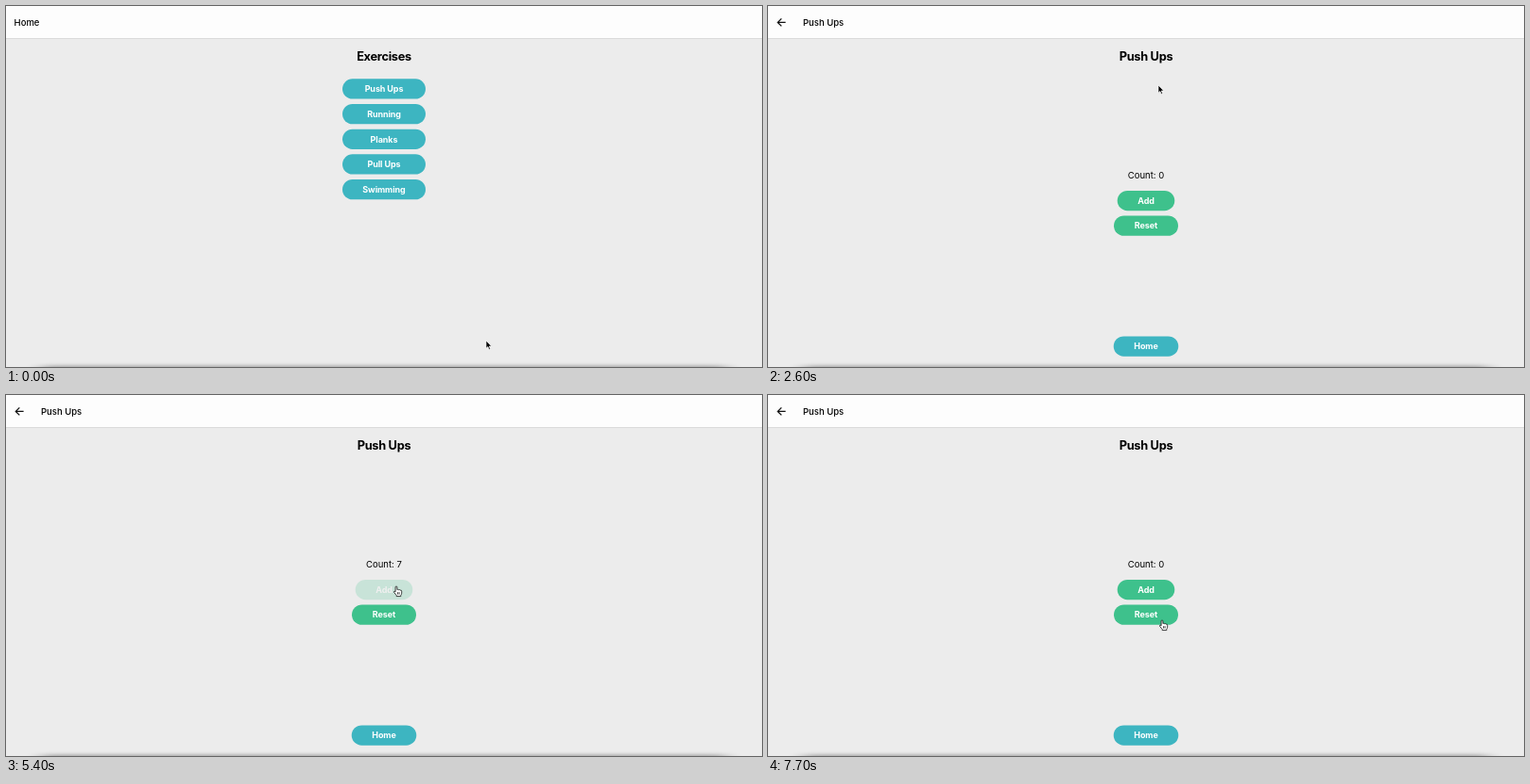
Animation of 800 by 383 pixels, one loop 8000 ms. Source, as an HTML page:

```html
<!DOCTYPE html>
<html lang="en">
<head>
<meta charset="utf-8">
<title>Exercise counter</title>
<style>
  html, body { margin: 0; width: 100%; height: 100%; overflow: hidden; background: #ececec; }
  svg { display: block; width: 100vw; height: 100vh; font-family: Inter, "Open Sans", sans-serif; }
  .nav { font-size: 9.5px; font-weight: 500; }
  .title { font-size: 12.8px; font-weight: 700; letter-spacing: -.3px; text-anchor: middle; }
  .count { font-size: 9.5px; text-anchor: middle; }
  .button text { font-size: 9px; font-weight: 700; letter-spacing: -.1px; text-anchor: middle; fill: #fff; }
  .teal rect { fill: #3db5c1; }
  .green rect { fill: #3ec18c; }
</style>
</head>
<body>
<svg viewBox="0 0 800 383" preserveAspectRatio="none">
  <defs>
    <filter id="blur" x="-10%" y="-300%" width="120%" height="700%">
      <feGaussianBlur stdDeviation="9 2.2"/>
    </filter>
  </defs>
  <rect width="800" height="383" fill="#ececec"/>
  <rect x="38" y="382" width="724" height="6" fill="#000" opacity=".36" filter="url(#blur)"/>
  <rect width="800" height="34" fill="#fdfdfd"/>
  <rect y="34" width="800" height="1" fill="#dadada"/>

  <g id="list">
    <text class="nav" x="8.6" y="21">Home</text>
    <text class="title" x="400" y="58.3">Exercises</text>
  </g>

  <g id="detail">
    <path d="M18.6 17.4H10.6M14.3 13.4L10.3 17.4L14.3 21.4" fill="none" stroke="#111" stroke-width="1.3"/>
    <text class="nav" x="37" y="21">Push Ups</text>
    <text class="title" x="400" y="58.3">Push Ups</text>
    <text class="count" id="count" x="400" y="183">Count: 0</text>
  </g>

  <g id="cursor">
    <path id="arrow" d="M0 0V8.2L1.9 6.5L3.2 9.4L4.6 8.8L3.3 6H5.8Z" fill="#000" stroke="#fff" stroke-width=".7"/>
    <path id="hand" d="M-.9 .9Q-.9 0 0 0Q.9 0 .9 .9V3.5Q1.6 2.9 2.5 3.7Q3.4 3.2 4.1 4.1Q5.6 3.8 5.7 5.2V7.2Q5.6 8.5 4.8 9.3V10.6H.2V9.6L-2.4 6.3Q-2.7 5.2-1.8 5.1L-.9 5.9Z M1.6 6.2V8.6M3.1 6.2V8.6" fill="#fff" stroke="#111" stroke-width=".8" stroke-linejoin="round"/>
  </g>
</svg>
<script>
const $ = id => document.getElementById(id);
const LOOP = 8000, STEP = 100;
const PAGE_SWITCH = 2560, RESET = 7430, PRESS = 80;
const ADDS = [4090, 4290, 4480, 4680, 4870, 5060, 5250, 5450, 5860, 6260];

// time, x, y of the pointer tip
const PATH = [
  [200, 508, 355], [700, 450, 215], [1100, 417, 96], [1200, 416, 90],
  [1400, 416, 90], [1700, 414, 86], [1800, 414, 86], [2100, 413, 84],
  [3000, 413, 84], [3300, 413, 128], [3700, 413, 198], [3900, 413, 203],
  [6500, 413, 203], [6900, 444, 219], [7200, 421, 236], [7400, 417, 239]
];

function button(parent, label, y, width, colour) {
  const g = document.createElementNS("http://www.w3.org/2000/svg", "g");
  g.setAttribute("class", "button " + colour);
  g.innerHTML = `<rect x="${400 - width / 2}" y="${y}" width="${width}" height="21.3" rx="10.65"/>
    <text x="400" y="${y + 13.9}">${label}</text>`;
  $(parent).append(g);
  return { g, y, width };
}

const exercises = ["Push Ups", "Running", "Planks", "Pull Ups", "Swimming"]
  .map((name, i) => button("list", name, 77.3 + i * 26.67, 88, "teal"));
const add = button("detail", "Add", 195.9, 60.6, "green");
const reset = button("detail", "Reset", 222.5, 68, "green");
const home = button("detail", "Home", 350.4, 68.6, "teal");

// Dims at once while held, eases back after each release.
function opacity(t, releases) {
  if (releases.some(r => t >= r - PRESS && t < r)) return .2;
  const last = releases.filter(r => r <= t).pop();
  if (last === undefined) return 1;
  const left = 1 - Math.min(1, (t - last) / 250);
  return 1 - .8 * left * left;
}

function pointer(t) {
  const i = PATH.findIndex(p => p[0] > t);
  if (i === 0) return PATH[0].slice(1);
  if (i < 0) return PATH[PATH.length - 1].slice(1);
  const [t0, x0, y0] = PATH[i - 1], [t1, x1, y1] = PATH[i];
  const k = (t - t0) / (t1 - t0);
  return [x0 + (x1 - x0) * k, y0 + (y1 - y0) * k];
}

const over = (b, x, y) => Math.abs(x - 400) < b.width / 2 && y >= b.y && y <= b.y + 21.3;

function draw(t) {
  const onList = t < PAGE_SWITCH;
  $("list").style.display = onList ? "" : "none";
  $("detail").style.display = onList ? "none" : "";

  const total = t < RESET ? ADDS.filter(r => r <= t).length : 0;
  $("count").textContent = "Count: " + total;
  exercises[0].g.setAttribute("opacity", opacity(t, [PAGE_SWITCH]));
  add.g.setAttribute("opacity", opacity(t, ADDS));
  reset.g.setAttribute("opacity", opacity(t, [RESET]));

  const [x, y] = pointer(t);
  const hit = (onList ? exercises : [add, reset, home]).some(b => over(b, x, y));
  $("cursor").setAttribute("transform", `translate(${x} ${y})`);
  $("hand").style.display = hit ? "" : "none";
  $("arrow").style.display = hit ? "none" : "";
}

const start = performance.now();
function tick() {
  const t = (performance.now() - start) % LOOP;
  draw(Math.floor(t / STEP) * STEP);
  requestAnimationFrame(tick);
}
tick();
</script>
</body>
</html>
```
